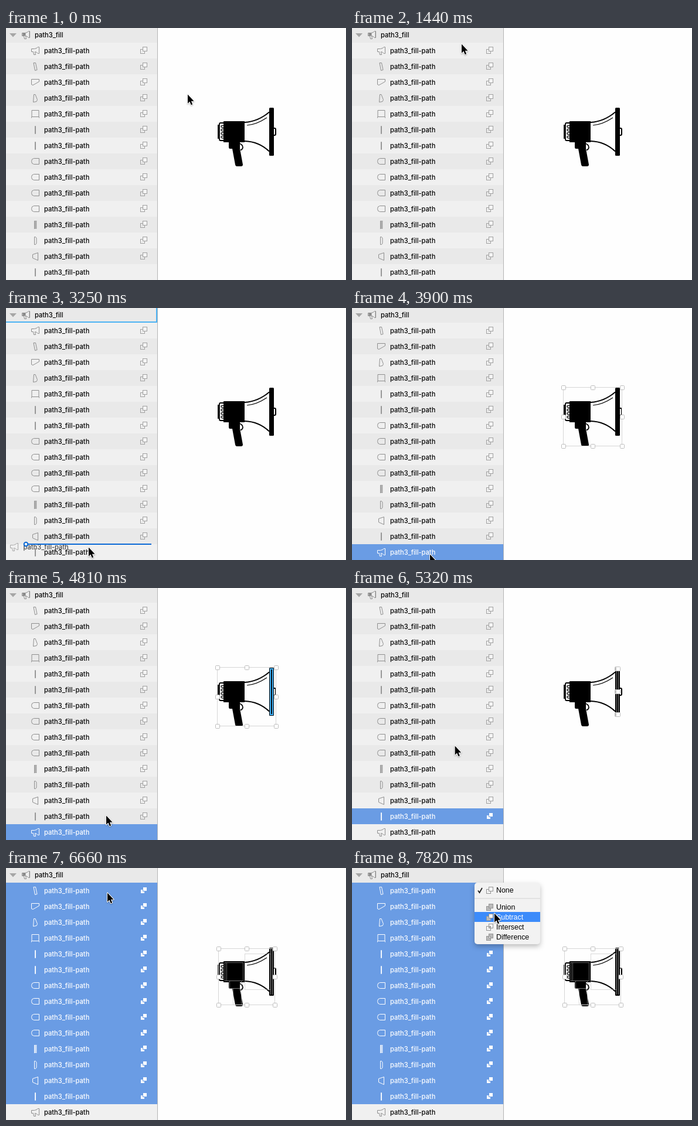
An HTML page for the animation above (8000 ms loop, 580x430 px).

```html
<!DOCTYPE html>
<html lang="en">
<head>
<meta charset="utf-8">
<title>Reordering layers</title>
<style>
html, body { margin: 0; width: 100%; height: 100%; overflow: hidden; background: #fefefe; }
svg { display: block; }
text { font: 500 11.1px Inter, sans-serif; fill: #000; }
.menu text { font: 12.4px "Liberation Sans", Arial, sans-serif; }
.menu .lit { fill: #fff; }
.panel { fill: #f2f2f2; filter: drop-shadow(0 4px 4px rgba(0, 0, 0, .25)); }
.cursor { filter: drop-shadow(0 1px 1px rgba(0, 0, 0, .3)); }
</style>
</head>
<body>
<svg id="stage" width="580" height="430" viewBox="0 0 580 430"></svg>
<script>
const LOOP = 8000, ROW = 27, TOP = 25;
const stage = document.getElementById('stage');

// Layer thumbnails, drawn around their centre
const SHAPES = {
  megaphone: 'M-6.5 -3.5H-1.5Q2.5 -4 4.5 -6.5H6.5V4.5H4.5Q2.5 2 -.5 1.5L.5 6.5H-2.5L-3.5 1.5H-6.5Z',
  grip: 'M-3 -6.5H.5L3 5.5L-.5 6.5Z',
  neck: 'M-6.5 -5.5H6.5V-1.5L-4 4.5L-6.5 3.5Z',
  trigger: 'M-2.5 -6.5H0L3.5 2.5L2 5.5L-3.5 6.5Z',
  frame: 'M-6 -6.5H6V4.5H-6ZM-6.5 4.5V6.5M6.5 4.5V6.5',
  bar: 'M-.4 -6.5V6.5H.4V-6.5Z',
  cap: 'M6.5 -5.5H-2.5Q-6.5 -5 -6.5 -.5T-2.5 4.5H6.5Z',
  teeth: 'M-1.5 -7V7M1 -7V7M-2 -6.5H2.5M-2 -4.5H2.5M-2 -2.5H2.5M-2 -.5H2.5M-2 1.5H2.5M-2 3.5H2.5M-2 5.5H2.5',
  slab: 'M-1.5 -6.5H0Q2 -5.5 2 -4V4Q2 5.5 0 6.5H-1.5Z',
  horn: 'M-4.5 -3.5L4.5 -6.5V6.5L-4.5 2.5Z'
};
const BEFORE = ['megaphone', 'grip', 'neck', 'trigger', 'frame', 'bar', 'bar', 'cap', 'cap',
  'cap', 'cap', 'teeth', 'slab', 'horn', 'bar'];
const AFTER = [...BEFORE.slice(1), BEFORE[0]];

// Pointer path: time, x, y
const PATH = [
  [960, 310, 114], [1440, 187, 28], [1680, 184, 37], [1970, 184, 37],
  [2480, 170, 164], [2660, 170, 164], [3250, 141, 409], [3480, 133, 421],
  [4230, 133, 421], [4810, 171, 389], [4980, 171, 389], [5780, 183, 84],
  [5960, 183, 72], [6130, 174, 46], [6360, 174, 46], [6480, 173, 43],
  [6800, 173, 43], [7170, 229, 41], [7460, 229, 41], [7820, 243, 78]
];

function pointer(t) {
  const i = PATH.findIndex(p => p[0] > t);
  if (i === 0) return PATH[0].slice(1);
  if (i < 0) return PATH[PATH.length - 1].slice(1);
  const [t0, x0, y0] = PATH[i - 1], [t1, x1, y1] = PATH[i];
  const k = (t - t0) / (t1 - t0), e = k * k * (3 - 2 * k);
  return [x0 + (x1 - x0) * e, y0 + (y1 - y0) * e];
}

const rect = (x, y, w, h, attrs) => `<rect x="${x}" y="${y}" width="${w}" height="${h}" ${attrs}/>`;
const path = (d, attrs) => `<path d="${d}" ${attrs}/>`;
const label = (x, y, s, attrs = '') => `<text x="${x}" y="${y}" ${attrs}>${s}</text>`;
const icon = (name, x, y, color, fill = 'none') =>
  path(SHAPES[name], `transform="translate(${x} ${y})" fill="${fill}" stroke="${color}"`);

function squares(y, back, front, line) {
  return rect(229.5, y - 1.5, 7, 7, `fill="${back}" stroke="${line}"`) +
    rect(233.5, y - 5.5, 7, 7, `fill="${front}" stroke="${line}"`);
}

function layer(name, i, picked, last) {
  const y = TOP + ROW * i, mid = y + 14;
  const fill = picked ? '#6a9ce4' : i % 2 ? '#e9e9e9' : '#f0f0f0';
  const mark = picked ? squares(mid - 1, '#fff', '#fff', '#6a9ce4') : squares(mid - 1, 'none', '#f4f4f4', '#a0a0a0');
  return rect(0, y, 258, ROW, `fill="${fill}"`) +
    icon(name, 50, mid, picked ? '#fff' : '#8e8e8e') +
    label(65, mid + 4, 'path3_fill-path', picked ? 'style="fill:#fff"' : '') +
    (last ? '' : mark);
}

function layers(t) {
  const order = t < 3900 ? BEFORE : AFTER;
  const picked = i => t >= 6660 ? i < 14 : t >= 4980 ? i === 13 : t >= 3900 && i === 14;
  return rect(0, 0, 258, TOP, 'fill="#e9e9e9"') + path('M6 9H18L12 15.5Z', 'fill="#a6a6a6"') +
    icon('megaphone', 34, 12, '#8a8a8a', '#efefef') +
    path('M29 9H33V13H29ZM40 6V16', 'fill="#888" stroke="#888"') +
    label(49, 16, 'path3_fill') +
    order.map((name, i) => layer(name, i, picked(i), i === 14)).join('') +
    rect(258, 0, 1, 430, 'fill="#b4b4b4"');
}

const GRIP = 'M380 194H399V206L404 233Q404 236 401 236H394Q391.5 236 391 233L386 206H382Q380 206 380 203Z';

const ART = path(GRIP, '') +
  rect(371, 159, 36, 36, '') + rect(449, 136, 8, 82, 'rx="1.5"') +
  `<g fill="none" stroke="#000" stroke-width="2">` +
  path('M407 161C424 160 439 152 449 143.5M407 193C424 193.5 439 201 449 210.5', '') +
  path('M457 171H458Q460 171 460 173V181Q460 183 458 183H457', '') +
  path('M398 197Q404 199 404 204Q403 208 400 208', 'stroke-width="1.8"') +
  path('M371 162H366Q364 162 364 164V190Q364 192 366 192H371M364 166H362V188H364', 'stroke-width="1.8"') +
  [168, 174, 180, 186].map(y => rect(367, y - 1.7, 7, 3.6, 'rx="1.8" stroke-width="1.3"')).join('') +
  path('M411 166C424 165 436 159 445 153', 'stroke-width="1.2"') + '</g>';

function handles(xs, ys) {
  return xs.flatMap((x, i) => ys.map((y, j) =>
    i === 1 && j === 1 && xs[2] - xs[0] > 10 ? '' :
      rect(x - 3.5, y - 3.5, 7, 7, 'rx="1" fill="#fff" stroke="#bdbdbd"'))).join('');
}

function bounds(x, y, size) {
  const h = size / 2;
  return rect(x - .5, y - .5, size, size, 'fill="none" stroke="#d6d6d6"') +
    handles([x, x + h, x + size], [y, y + h, y + size]);
}

const plateLines = path('M451.5 138V216M454.5 138V216', 'stroke="#aaa" stroke-width=".8"');

function selection(t, y) {
  if (t < 3900) return '';
  if (t < 4980) {
    const hover = t >= 4290 && y < 403;
    return (hover ? rect(449.5, 136.5, 7, 81, 'rx="1" fill="#43b1f5" stroke="#000"') +
      rect(452.2, 139, 1.8, 76, '') : '') + bounds(361, 136, 100);
  }
  if (t < 6660) {
    return plateLines + handles([452, 453, 454], [138, 177, 216]) +
      (y < 52 ? path(GRIP, 'fill="none" stroke="#43b1f5" stroke-width="2"') : '');
  }
  return plateLines + '<g fill="none" stroke="#bbb" stroke-width=".8" opacity=".65">' +
    rect(407.5, 146.5, 44, 61, '') + rect(373.5, 161.5, 31, 31, '') +
    rect(381.5, 192.5, 20, 13, '') + rect(387.5, 205.5, 14, 28, '') +
    path('M376.5 161V193', '') + '</g>' + bounds(363, 138, 96);
}

function drag(t, x, y) {
  if (t < 2030 || t >= 3900) return '';
  const slot = TOP + ROW * Math.round((y - TOP) / ROW);
  return path('M0 24H257V0', 'fill="none" stroke="#4bb2f3" stroke-width="2"') +
    `<g opacity=".7" transform="translate(${x - 177} ${y - 40})">` +
    icon('megaphone', 50, 39, '#888') + label(65.5, 43, 'path3_fill-path') + '</g>' +
    path(`M38 ${slot}H248`, 'stroke="#0b69d6" stroke-width="2"') +
    `<circle cx="34" cy="${slot}" r="3.3" fill="#f4f4f4" stroke="#0b69d6" stroke-width="2"/>`;
}

// Name, centre, back fill, front fill
const MENU = [
  ['None', 38, '#f4f4f4', '#f4f4f4'], ['Union', 67, '#bbb', '#bbb'],
  ['Subtract', 84, '#bbb', '#f4f4f4'], ['Intersect', 101, '#f4f4f4', '#f4f4f4'],
  ['Difference', 118, '#bbb', '#bbb']
];

function menu(t, y) {
  if (t < 7350) return '';
  const items = MENU.map(([name, mid, back, front]) => {
    const lit = y >= mid - 9 && y < mid + 8;
    const overlap = name === 'Intersect' ? '#bbb' : name === 'Difference' ? '#eee' : '';
    return (lit ? rect(209, mid - 9, 112, 17, 'fill="#3c8bfa"') : '') +
      squares(mid, back, front, '#949494') +
      (overlap ? rect(233.5, mid - 1.5, 3, 3, `fill="${overlap}" stroke="#949494"`) : '') +
      (name === 'None' ? path('M215 38.5L217.5 42L222 34', `fill="none" stroke="${lit ? '#fff' : '#222'}" stroke-width="1.8"`) : '') +
      label(246, mid + 4.3, name, lit ? 'class="lit"' : '');
  }).join('');
  return '<g class="menu">' + rect(209, 25, 112, 105, 'rx="5" class="panel"') +
    rect(209, 51.5, 112, 1, 'fill="#d4d4d4"') + items + '</g>';
}

const cursor = (x, y) => path('M0 -.5V14.7L3.4 11.6L5.8 17.2L8.2 16.2L5.9 10.7H10.6Z',
  `class="cursor" transform="translate(${x} ${y})" stroke="#fff" stroke-width="2" stroke-linejoin="round" paint-order="stroke"`);

function draw(now) {
  const t = now % LOOP, [x, y] = pointer(t);
  stage.innerHTML = rect(0, 0, 580, 430, 'fill="#fefefe"') + layers(t) + ART +
    selection(t, y) + drag(t, x, y) + menu(t, y) + cursor(x, y);
}

const start = performance.now();
function tick() {
  draw(performance.now() - start);
  requestAnimationFrame(tick);
}
tick();
</script>
</body>
</html>
```
